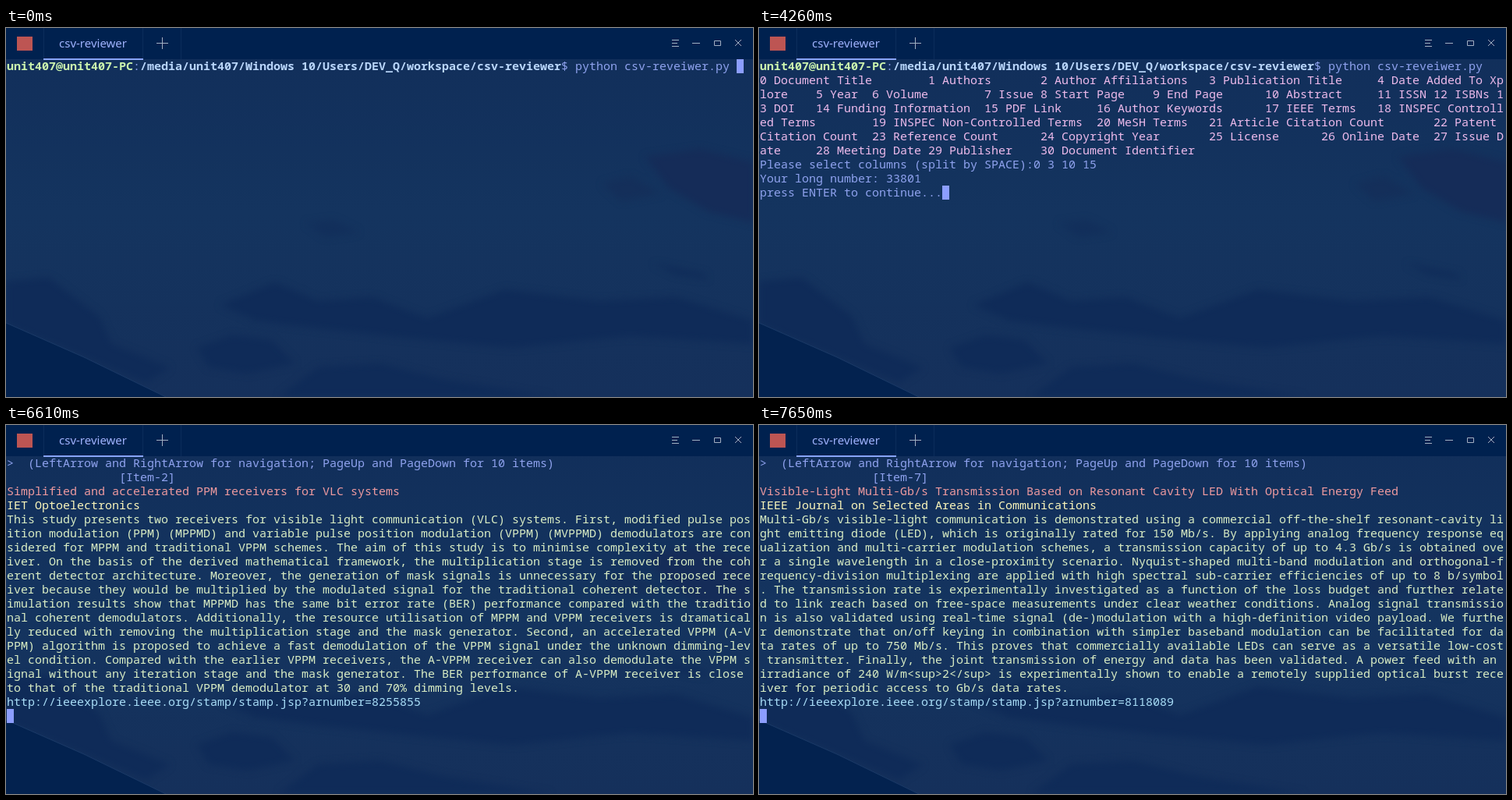
These frames come from a looping animation (958x473 px, 8 s). An HTML page:

```html
<!DOCTYPE html>
<html lang="en">
<head>
<meta charset="utf-8">
<title>csv-reviewer</title>
<style>
html, body { margin: 0; width: 100%; height: 100%; overflow: hidden; background: #13315c; }
svg { position: absolute; left: 0; top: 0; }
#screen {
  position: absolute; left: 1px; top: 39px; margin: 0; color: #8fa2ee;
  font: 15px/18px "Noto Sans Mono", "DejaVu Sans Mono", monospace;
}
#screen i {
  display: inline-block; position: relative; top: 1px; width: 9px; height: 18px;
  vertical-align: top; background: #8c9eff;
}
#bar { position: absolute; left: 950px; top: 220px; width: 4px; height: 253px; background: #566a9c; }
.tab { font: 15px "Noto Sans", sans-serif; fill: #9fb1fb; }
.host { color: #ccf5ae; font-weight: bold; }
.path { color: #b9d6fb; font-weight: bold; }
.list { color: #eebbec; }
.title { color: #ee9a9f; }
.journal { color: #fbf6bb; }
.body { color: #d9edc4; }
.link { color: #a9def8; }
</style>
</head>
<body>
<svg width="958" height="473" viewBox="0 0 958 473">
  <defs>
    <linearGradient id="sky" x2="0" y2="1">
      <stop offset="0" stop-color="#112e5a"/>
      <stop offset=".5" stop-color="#14345f"/>
      <stop offset="1" stop-color="#15305b"/>
    </linearGradient>
    <filter id="soft" x="-20%" y="-20%" width="140%" height="140%" color-interpolation-filters="sRGB">
      <feGaussianBlur stdDeviation="5"/>
    </filter>
  </defs>
  <rect width="958" height="473" fill="url(#sky)"/>
  <g filter="url(#soft)" fill="#0f2b58">
    <path d="M820 165L890 155 960 172V250L900 235 850 205Z" fill="#152c58"/>
    <path d="M765 200L800 190 840 212 790 222Z" fill="#142f5a"/>
    <path d="M830 302L895 315 900 322 860 316Z"/>
    <path d="M385 250L420 246 452 262 410 268Z" fill="#122f5b"/>
    <path d="M275 355L345 326 400 350 470 345 540 372 640 335 760 350 860 345 958 375V405L800 395 650 410 520 398 400 385 320 375Z"/>
    <path d="M245 410L290 394 340 400 370 430 310 443 260 435Z"/>
    <path d="M0 325L55 320 120 370 135 405 210 435 180 455 0 380Z"/>
    <path d="M350 473L400 435 480 430 560 450 700 473Z"/>
  </g>
  <path d="M0 378L100 422 205 473H0Z" fill="#03224f"/>
  <path d="M0 378L100 422 205 473" fill="none" stroke="#1a3966"/>
  <rect width="958" height="40" fill="#00214f"/>
  <path d="M48.5 0V40M175.5 0V40M224.5 0V40" stroke="#0c2d5b"/>
  <rect x="48" y="39" width="128" height="2" fill="#88a4f7"/>
  <rect x="14" y="11" width="20" height="18" fill="#bd5553"/>
  <text class="tab" x="68" y="25">csv-reviewer</text>
  <path d="M193 19.5H208M200.5 12V27M854 15.5H863M854 19.5H861M854 23.5H863M880 19.5H890M908.5 16.5H916.5V22.5H908.5ZM935 15L943 23M943 15L935 23" fill="none" stroke="#a3afc2"/>
</svg>
<pre id="screen"></pre>
<div id="bar"></div>
<script>
const COLS = 106, LOOP = 8000;
const screen = document.getElementById("screen"), bar = document.getElementById("bar");
const wrap = s => s.match(new RegExp(`.{1,${COLS}}`, "g")).join("\n");

const user = "unit407";
const prompt = [
  ["host", `${user}@${user}-PC`], ["", ":"],
  ["path", `/media/${user}/Windows 10/Users/DEV_Q/workspace/csv-reviewer`],
  ["", "$ python csv-reveiwer.py "]
];

// Tab stops every 8 columns; the last column is the final stop
const columns = `Document Title,Authors,Author Affiliations,Publication Title,Date Added To Xplore,Year,Volume,Issue,Start Page,End Page,Abstract,ISSN,ISBNs,DOI,Funding Information,PDF Link,Author Keywords,IEEE Terms,INSPEC Controlled Terms,INSPEC Non-Controlled Terms,MeSH Terms,Article Citation Count,Patent Citation Count,Reference Count,Copyright Year,License,Online Date,Issue Date,Meeting Date,Publisher,Document Identifier`
  .split(",").reduce((s, name, i) => {
    const col = s.length % COLS;
    const stop = i ? Math.min((col | 7) + 1, COLS - 1) : 0;
    return s + " ".repeat(stop - col) + i + " " + name;
  }, "");

const ask = (typed, after = "") => [
  ...prompt, ["list", "\n" + wrap(columns) + "\n"],
  ["", "Please select columns (split by SPACE):" + typed + after]
];

const texts = {
  0: "The modulation bandwidth of color-converting phosphors used in white light-emitting diodes severely limits the channel capacity of visible light communication (VLC). A variety of color converters replacing the conventional phosphors have been demonstrated and the bandwidth has been enhanced by more than an order of magnitude. However, such enhancement is limited by the intrinsic properties of molecular structures. Here we propose an alternative strategy of using nanopatterned hyperbolic metamaterials (HMMs) to achieve high-bandwidth color converters. A quantitative model is established to analyze the impact of nanopatterned HMMs on bandwidths and signal-to-noise ratios. We experimentally demonstrate a nanopatterned VLC color converter system with a bandwidth enhancement of 67%. To the best of our knowledge, this is the first demonstration of HMM-based color converter for the VLC application. This route provides a solution of breaking through the intrinsic bandwidth limit of color converters.",
  2: "This study presents two receivers for visible light communication (VLC) systems. First, modified pulse position modulation (PPM) (MPPMD) and variable pulse position modulation (VPPM) (MVPPMD) demodulators are considered for MPPM and traditional VPPM schemes. The aim of this study is to minimise complexity at the receiver. On the basis of the derived mathematical framework, the multiplication stage is removed from the coherent detector architecture. Moreover, the generation of mask signals is unnecessary for the proposed receiver because they would be multiplied by the modulated signal for the traditional coherent detector. The simulation results show that MPPMD has the same bit error rate (BER) performance compared with the traditional coherent demodulators. Additionally, the resource utilisation of MPPM and VPPM receivers is dramatically reduced with removing the multiplication stage and the mask generator. Second, an accelerated VPPM (A-VPPM) algorithm is proposed to achieve a fast demodulation of the VPPM signal under the unknown dimming-level condition. Compared with the earlier VPPM receivers, the A-VPPM receiver can also demodulate the VPPM signal without any iteration stage and the mask generator. The BER performance of A-VPPM receiver is close to that of the traditional VPPM demodulator at 30 and 70% dimming levels.",
  4: "The Visible Light Communication (VLC) can provide data transmission via the illumination Light Emitting Diodes (LED). This paper introduces a new model to analyze the Bit Error Rate (BER) of Binary Phase Modulation (BPM) in VLC for an arbitrary modulation depth and data duty cycle while taking into account both the Gaussian and signal-dependent shot noise. The impact of the driver design on the BER and its impact on ripple, have not been considered in detail before. We compare two different LED driver schemes, namely directly adapting the driver control loop and binary shunting. We address data rate, BER and power efficiency, for which we propose to use the Extra Energy Per Symbol (EEPS) above unmodulated light. We further introduce an analysis of the effect that (truncated) ripple interference has in the (matched or other) filter of the receiver. Ripple causes a harmful interference in VLC and thus a BER expression is derived to include its effect. Two approximations are proposed to model the ripple interference and their accuracies are compared by simulations. A low-pass filtering is proposed to alleviate the impact of ripple interference in VLC system.",
  7: "Multi-Gb/s visible-light communication is demonstrated using a commercial off-the-shelf resonant-cavity light emitting diode (LED), which is originally rated for 150 Mb/s. By applying analog frequency response equalization and multi-carrier modulation schemes, a transmission capacity of up to 4.3 Gb/s is obtained over a single wavelength in a close-proximity scenario. Nyquist-shaped multi-band modulation and orthogonal-frequency-division multiplexing are applied with high spectral sub-carrier efficiencies of up to 8 b/symbol. The transmission rate is experimentally investigated as a function of the loss budget and further related to link reach based on free-space measurements under clear weather conditions. Analog signal transmission is also validated using real-time signal (de-)modulation with a high-definition video payload. We further demonstrate that on/off keying in combination with simpler baseband modulation can be facilitated for data rates of up to 750 Mb/s. This proves that commercially available LEDs can serve as a versatile low-cost transmitter. Finally, the joint transmission of energy and data has been validated. A power feed with an irradiance of 240 W/m<sup>2</sup> is experimentally shown to enable a remotely supplied optical burst receiver for periodic access to Gb/s data rates."
};

// Short-lived pages take their sentences from the pool, filling a given number of rows
const pool = Object.values(texts).join(" ").split(/(?<=\.) (?=[A-Z])/);
function mix(start, rows) {
  let s = pool[start];
  for (let k = 1; s.length <= (rows - 1) * COLS + 40; k++) s += " " + pool[(start + 5 * k) % pool.length];
  return s.slice(0, rows * COLS - 30) + ".";
}

const item = (n, title, journal, id, text = texts[n]) => [
  ["", (n ? ">  " : "") + "(LeftArrow and RightArrow for navigation; PageUp and PageDown for 10 items)\n" +
    " ".repeat(16) + `[Item-${n}]\n`],
  ["title", wrap(title) + "\n"],
  ["journal", journal + "\n"],
  ["body", wrap(text) + "\n"],
  ["link", `http://ieeexplore.ieee.org/stamp/stamp.jsp?arnumber=${id}\n`]
];

const states = [
  [0, prompt],
  [1350, ask("")],
  [2650, ask("0 ")],
  [3010, ask("0 3 ")],
  [3440, ask("0 3 10")],
  [3800, ask("0 3 10 1")],
  [4260, ask("0 3 10 15", "\nYour long number: 33801\npress ENTER to continue...")],
  [5420, item(0, "Enhancing Communication Bandwidths of Organic Color Converters Using Nanopatterned Hyperbolic Metamaterials", "Journal of Lightwave Technology", 8258897)],
  [6150, item(1, "Bandwidth Limits of Color Converters in Indoor Visible Light Links", "IEEE Photonics Journal", 8257014, mix(1, 12))],
  [6610, item(2, "Simplified and accelerated PPM receivers for VLC systems", "IET Optoelectronics", 8255855)],
  [6810, item(3, "Dimming Control and Error Rates in Visible Light Receivers With Shot Noise", "IEEE Access", 8254960, mix(18, 15))],
  [6990, item(4, "Performance Analysis for Joint Illumination and Visible Light Communication using Buck Driver", "IEEE Transactions on Communications", 8254381)],
  [7340, item(5, "Low-Complexity Equalization for Light Emitting Diode Transmitters", "IEEE Photonics Technology Letters", 8240602, mix(10, 11))],
  [7480, item(6, "Multi-Band Modulation for Short Range Optical Wireless Links", "Journal of Lightwave Technology", 8196745, mix(29, 11))],
  [7650, item(7, "Visible-Light Multi-Gb/s Transmission Based on Resonant Cavity LED With Optical Energy Feed", "IEEE Journal on Selected Areas in Communications", 8118089)]
];

let shown;
function show(state) {
  if (state === shown) return;
  shown = state;
  screen.replaceChildren(...state[1].map(([cls, text]) => {
    const span = document.createElement("span");
    span.className = cls;
    span.textContent = text;
    return span;
  }), document.createElement("i"));
  bar.hidden = state[0] !== 5420;
}

function frame() {
  const t = performance.now() % LOOP;
  show(states.findLast(s => s[0] <= t));
  requestAnimationFrame(frame);
}
frame();
</script>
</body>
</html>
```
